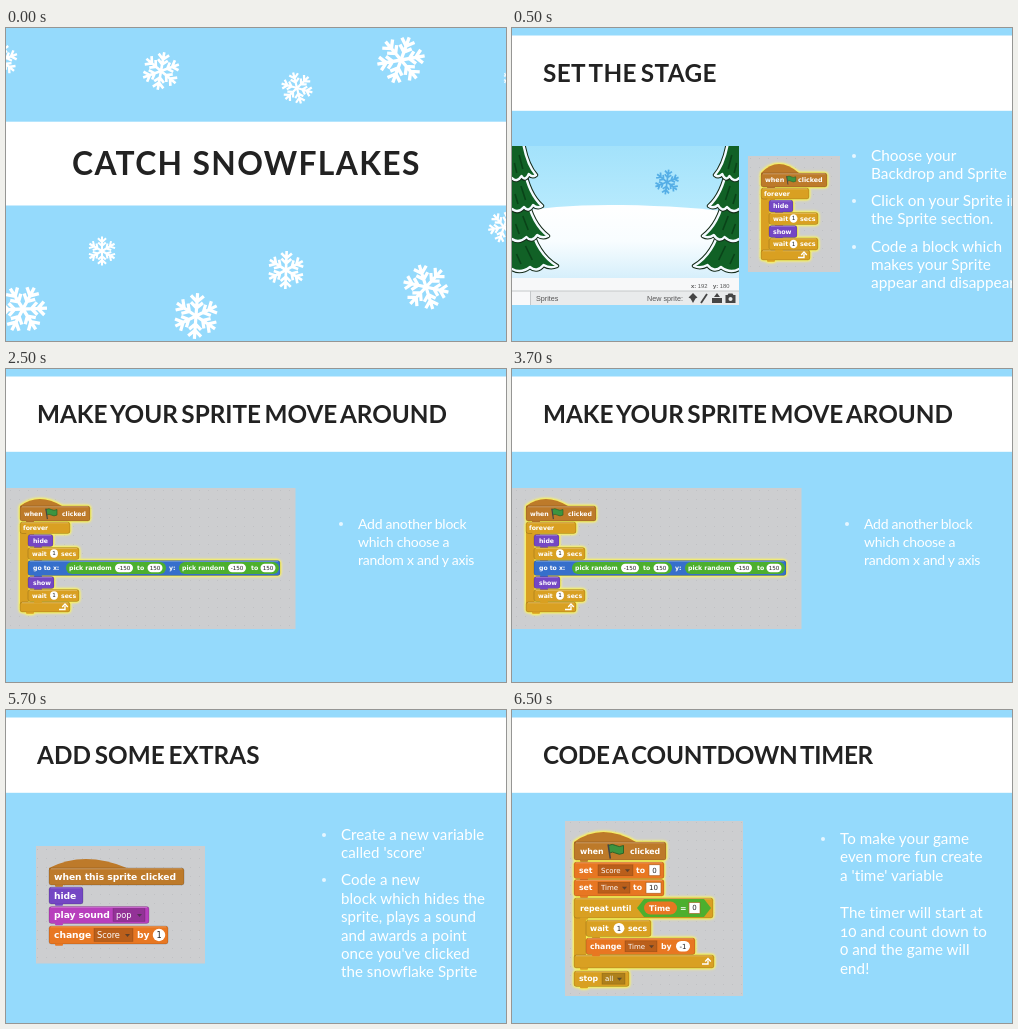
An HTML page for the animation above (8000 ms loop, 500 by 313 pixels).

```html
<!DOCTYPE html>
<html lang="en">
<head>
<meta charset="utf-8">
<title>Catch Snowflakes</title>
<style>
html, body { margin: 0; width: 100%; height: 100%; overflow: hidden; background: #95dafc; }
svg { display: block; }
#stage { width: 500px; height: 313px; }
.slide { display: none; }
.slide.on { display: inline; }
.head { font: 700 24.3px Lato, sans-serif; word-spacing: -2.5px; fill: #222; }
.body { font-family: Lato, sans-serif; fill: #fff; font-variant-numeric: oldstyle-nums; }
.code { font-family: "DejaVu Sans", sans-serif; font-weight: 700; fill: #fff; }
.code .val { font-weight: 400; font-size: .9em; }
.glow { filter: drop-shadow(0 0 .8px #fbf04c) drop-shadow(0 0 1px #fbf04c) drop-shadow(0 0 1.2px #f6f08a); }
.ui { font-family: "Liberation Sans", sans-serif; fill: #555; }
</style>
</head>
<body>
<svg id="stage" viewBox="0 0 500 313">
  <defs>
    <path id="arm" d="M0 0V-10M-2.8-8.8L0-6.2 2.8-8.8M-2.6-5.9L0-3.5 2.6-5.9"/>
    <g id="flake" fill="none" stroke-width="1.4"></g>
    <g id="tree" stroke-linejoin="round"></g>
    <pattern id="dots" width="9" height="9" patternUnits="userSpaceOnUse">
      <path d="M4 4h1v1h-1z" fill="#bbbdc0" opacity=".7"/>
    </pattern>
    <linearGradient id="sky" x2="0" y2="1">
      <stop stop-color="#a3e2fb"/><stop offset="1" stop-color="#b9ebfd"/>
    </linearGradient>
    <linearGradient id="snow" x2="0" y2="1">
      <stop stop-color="#fff"/><stop offset=".5" stop-color="#f8fdff"/><stop offset="1" stop-color="#d6effb"/>
    </linearGradient>
  </defs>
</svg>
<script>
const stage = document.getElementById("stage");
const GOLD = "#d9a022", HAT = "#bd7a2a", PURPLE = "#7447c4", ORANGE = "#e87722",
      BLUE = "#366fcb", GREEN = "#4caf2e", PINK = "#b83fbd";

document.getElementById("flake").innerHTML =
  [0, 60, 120, 180, 240, 300].map(a => `<use href="#arm" transform="rotate(${a})"/>`).join("");

// Half a fir tree, lowest tier first: tip x, tip y, top y
document.getElementById("tree").innerHTML =
  [[45, 238, 196], [36, 208, 168], [30, 178, 140], [24, 147, 105]].map(([x, y, top]) => {
    const d = `M-20 ${top}H${x * .4}Q${x * .55} ${y - 12} ${x} ${y}Q${x * .85} ${y + 3} ${x * .7} ${y - 1}` +
      `Q${x * .55} ${y + 7} ${x * .4} ${y + 1}Q${x * .2} ${y + 8} 0 ${y + 3}H-20Z`;
    return `<path d="${d}" fill="none" stroke="#142a18" stroke-width="4.4"/><path d="${d}" fill="#116126" stroke="#f4fbff" stroke-width="2.4"/>` +
      `<path d="M${x * .3} ${y - 20}L${x * .45} ${y - 6}M${x * .1} ${y - 12}L${x * .2} ${y - 2}" stroke="#0a4319" stroke-width="1.6"/>`;
  }).join("");

const rect = (x, y, w, h, fill, more = "") =>
  `<rect x="${x}" y="${y}" width="${w}" height="${h}" fill="${fill}" ${more}/>`;
const flake = (x, y, r, turn, color = "#fff") =>
  `<use href="#flake" stroke="${color}" transform="translate(${x} ${y}) rotate(${turn}) scale(${r / 10})"/>`;

// Parts of a code block, placed around its middle line y = 0
const label = (x, s, more = "") => `<text x="${x}" dy=".34em" ${more}>${s}</text>`;
const value = (x, s) => label(x, s, 'class="val" fill="#222" text-anchor="middle"');
const num = (cx, w, s) => rect(cx - w / 2, "-.67em", w, "1.34em", "#fff", 'rx=".67em"') + value(cx, s);
const box = (x, w, s) => rect(x, "-.7em", w, "1.4em", "#fff", 'stroke="#a85a1c" stroke-width=".6"') + value(x + w / 2, s);
const drop = (x, w, s) => rect(x, "-.7em", w, "1.4em", "#0003", 'stroke="#0003" stroke-width=".7"') +
  label(x + 3, s, 'class="val"') + `<path d="M${x + w - 8}-1h5l-2.5 3z" fill="#333a"/>`;
const flag = (x, k) => `<g transform="translate(${x} 0) scale(${k})"><path d="M1-5Q5-7 8-5T15-5V2Q11 4 8 2T2 2" fill="#3d9440" stroke="#255f27" stroke-width=".8"/><path d="M1-6L3 7" stroke="#444" stroke-width="1.4"/></g>`;
const pick = (x, cx1, to, cx2) => rect(x, -6, 100, 12, GREEN, 'rx="6"') +
  label(x + 3, "pick random") + num(cx1, 18, "-150") + label(to, "to") + num(cx2, 15, "150");

const block = (x, y, w, h, color, ...parts) =>
  rect(x, y, w, h, color, 'rx="2.5" stroke="#0003" stroke-width=".8"') +
  rect(x + 6, y + h - .5, 8, 2.2, color, 'rx="1"') +
  `<path d="M${x + 2} ${y + .8}H${x + w - 2}" stroke="#fff5" stroke-width=".8"/>` +
  `<g transform="translate(0 ${y + h / 2})">${parts.join("")}</g>`;
const hat = (x, y, w, h, rise, span, ...parts) =>
  `<path d="M${x} ${y + 4}V${y}Q${x + span * .45} ${y - rise * 2} ${x + span} ${y}V${y + 4}Z" fill="${HAT}"/>` +
  block(x, y, w, h, HAT, ...parts);
const arm = (x, y, w, h, foot) => rect(x, y, w, h, GOLD, 'rx="2"') + foot;
const loopArrow = (x, y) => `<path d="M${x - 5} ${y + 2.5}H${x + 1}V${y - 1}M${x - 1.8} ${y}L${x + 1} ${y - 3} ${x + 3.8} ${y}" fill="none" stroke="#fff" stroke-width="1.4"/>`;
const panel = (x, y, w, h, size, glow, ...blocks) =>
  rect(x, y, w, h, "#cdced0") + rect(x, y, w, h, "url(#dots)") +
  `<g class="code" font-size="${size}" letter-spacing="-.05"><g class="${glow ? "glow" : ""}">${blocks.join("")}</g></g>`;

const page = (title, gap, ...parts) =>
  rect(0, 7.5, 500, 75.3, "#fff") +
  `<text class="head" x="31" y="54" letter-spacing="${gap}">${title}</text>` + parts.join("");
// Each line is [baseline, text]; a leading * puts a bullet before it
const notes = (x, size, gap, lines) =>
  `<g class="body" font-size="${size}" letter-spacing="${gap}">` + lines.map(([y, s]) =>
    (s[0] == "*" ? `<circle cx="${x - 17}" cy="${y - 5}" r="2" fill="#e6f6ff"/>` : "") +
    `<text x="${x}" y="${y}">${s.replace("*", "")}</text>`).join("") + "</g>";

const scene = '<svg y="118" width="227" height="132" viewBox="0 118 227 132">' +
  rect(0, 118, 227, 70, "url(#sky)") +
  '<path d="M0 185Q45 176 110 177T227 185V250H0Z" fill="url(#snow)"/>' +
  flake(155, 154, 12.5, 8, "#55aee6") +
  '<use href="#tree"/><use href="#tree" transform="translate(227 0) scale(-1 1)"/></svg>' +
  rect(0, 250, 227, 13, "#f7f8f9") + rect(0, 263, 227, 14, "#e9ebec") + rect(0, 263, 18, 14, "#f8f9fa") +
  '<path d="M0 263H227M18.5 263V277" stroke="#c5c8ca"/>' +
  `<g class="ui" font-size="7.2"><text x="24" y="273">Sprites</text><text x="135" y="273">New sprite:</text>
   <g font-size="5.8"><text x="179" y="259.5"><tspan font-weight="700">x:</tspan> 192</text><text x="201" y="259.5"><tspan font-weight="700">y:</tspan> 180</text></g></g>
   <path d="M181 265l4.5 4.5-2 1-2.5 4.5-2.5-4.5-2-1z M200 270h10v5h-10z M202 269l3-4 3 4z M213.5 267h2l1-1.5h4l1 1.5h2v8h-10z" fill="#454545"/>
   <path d="M189 275l6-9" stroke="#454545" stroke-width="1.8"/><circle cx="218.5" cy="271" r="2" fill="#e9ebec"/>`;

const wait = (x, y, w, h, cx, secs) =>
  block(x, y, w, h, GOLD, label(x + 4, "wait"), num(cx, h * .66, "1"), label(secs, "secs"));

const slides = [
  rect(0, 93.7, 500, 83.8, "#fff") +
  '<text x="66" y="146.7" font-family="Lato, sans-serif" font-weight="700" font-size="31.8" letter-spacing="1.35" fill="#222">CATCH SNOWFLAKES</text>' +
  [[-5, 32, 17, 10], [155, 43, 19, 10], [291, 60, 16, -14], [395, 32, 24, 20], [506, 50, 9, 0], [96, 223, 14.5, 0],
   [280, 242, 19, 2], [420, 259, 23, -17], [190, 288, 23, 4], [17, 281, 24, 28], [498, 199, 16, 20]]
    .map(f => flake(...f)).join(""),

  page("SET THE STAGE", .4, scene,
    panel(236, 128, 92, 116, 6.4, true,
      arm(249, 162, 8.5, 68, block(249, 222, 49, 10, GOLD, loopArrow(291, 0))),
      hat(249, 145, 66, 14, 9, 38, label(253, "when"), flag(274, .65), label(286, "clicked")),
      block(249, 160, 48, 11, GOLD, label(252, "forever")),
      block(257, 172, 24, 12, PURPLE, label(261, "hide")),
      wait(257, 184.5, 49, 12, 281.5, 288),
      block(257, 197.5, 28, 12, PURPLE, label(261, "show")),
      wait(257, 210, 49, 12, 281.5, 288)),
    notes(359, 15.4, 0, [[133, "*Choose your"], [151, "Backdrop and Sprite"],
      [178, "*Click on your Sprite in"], [196, "the Sprite section."],
      [224, "*Code a block which"], [242, "makes your Sprite"], [260, "appear and disappear"]])),

  page("MAKE YOUR SPRITE MOVE AROUND", 0,
    panel(0, 119, 289.5, 141, 6.2, true,
      arm(14, 155, 8.5, 86, block(14, 233, 50, 10, GOLD, loopArrow(58, 0))),
      hat(14, 137, 70, 15, 7, 42, label(18, "when"), flag(39, .8), label(56, "clicked")),
      block(14, 153, 50, 11.5, GOLD, label(17, "forever")),
      block(22, 165.5, 25, 12, PURPLE, label(27, "hide")),
      wait(22, 178.5, 51, 12, 48, 55),
      block(22, 191.5, 252, 15, BLUE, label(27, "go to x:"), pick(60, 118, 131, 149),
        label(163, "y:"), pick(173, 231, 245, 262)),
      block(22, 207.5, 26, 12, PURPLE, label(27, "show")),
      wait(22, 220.5, 51, 12, 48, 55)),
    notes(352, 14, -.25, [[160, "*Add another block"], [178, "which choose a"], [196, "random x and y axis"]])),

  page("ADD SOME EXTRAS", .1,
    panel(30, 136, 169, 117.5, 9.2, false,
      hat(43, 158, 135, 17, 9, 78, label(48, "when this sprite clicked")),
      block(43, 177, 34, 17, PURPLE, label(48, "hide")),
      block(43, 196.5, 100, 17, PINK, label(48, "play sound"), drop(107, 32, "pop")),
      block(43, 216, 119, 18, ORANGE, label(48, "change"), drop(88, 39, "Score"), label(131, "by"), num(153, 12.5, "1"))),
    notes(335, 15.1, .05, [[130, "*Create a new variable"], [148, "called 'score'"],
      [175, "*Code a new"], [194, "block which hides the"], [212, "sprite, plays a sound"],
      [231, "and awards a point"], [249, "once you've clicked"], [267, "the snowflake Sprite"]])),

  page("CODE A COUNTDOWN TIMER", -.25,
    panel(53, 111, 178, 175, 7.8, true,
      arm(62, 200, 12, 57, block(62, 245, 140, 13, GOLD, loopArrow(195, 0))),
      hat(62, 132, 92, 18, 10, 62, label(68, "when"), flag(95, 1.1), label(118, "clicked")),
      block(62, 152, 90, 16.5, ORANGE, label(67, "set"), drop(86, 35, "Score"), label(124, "to"), box(137, 11, "0")),
      block(62, 169.5, 90, 16.5, ORANGE, label(67, "set"), drop(86, 32, "Time"), label(121, "to"), box(134, 15, "10")),
      block(62, 188, 139, 20, GOLD, label(68, "repeat until"),
        `<path d="M125 0L132-9H192L199 0 192 9H132Z" fill="${GREEN}"/>`,
        rect(132, -6.5, 33, 13, ORANGE, 'rx="6.5"'), label(137, "Time"), label(168, "="), box(177, 11, "0")),
      wait(74, 210, 65, 16.5, 107, 116),
      block(74, 228, 109, 16.5, ORANGE, label(78, "change"), drop(113, 32, "Time"), label(149, "by"), num(171, 14, "-1")),
      block(62, 261, 55, 15.5, GOLD, label(67, "stop"), drop(90, 23, "all"))),
    notes(328, 15.2, .05, [[134, "*To make your game"], [152, "even more fun create"], [171, "a 'time' variable"],
      [208, "The timer will start at"], [227, "10 and count down to"], [245, "0 and the game will"], [264, "end!"]]))
];

stage.insertAdjacentHTML("beforeend", slides.map(s => `<g class="slide">${s}</g>`).join(""));
const layers = [...document.querySelectorAll(".slide")];
const cuts = [500, 2500, 4500, 6500, 8000];

function draw() {
  const t = performance.now() % 8000;
  const now = cuts.findIndex(end => t < end);
  layers.forEach((g, i) => g.classList.toggle("on", i === now));
  requestAnimationFrame(draw);
}
draw();
</script>
</body>
</html>
```
